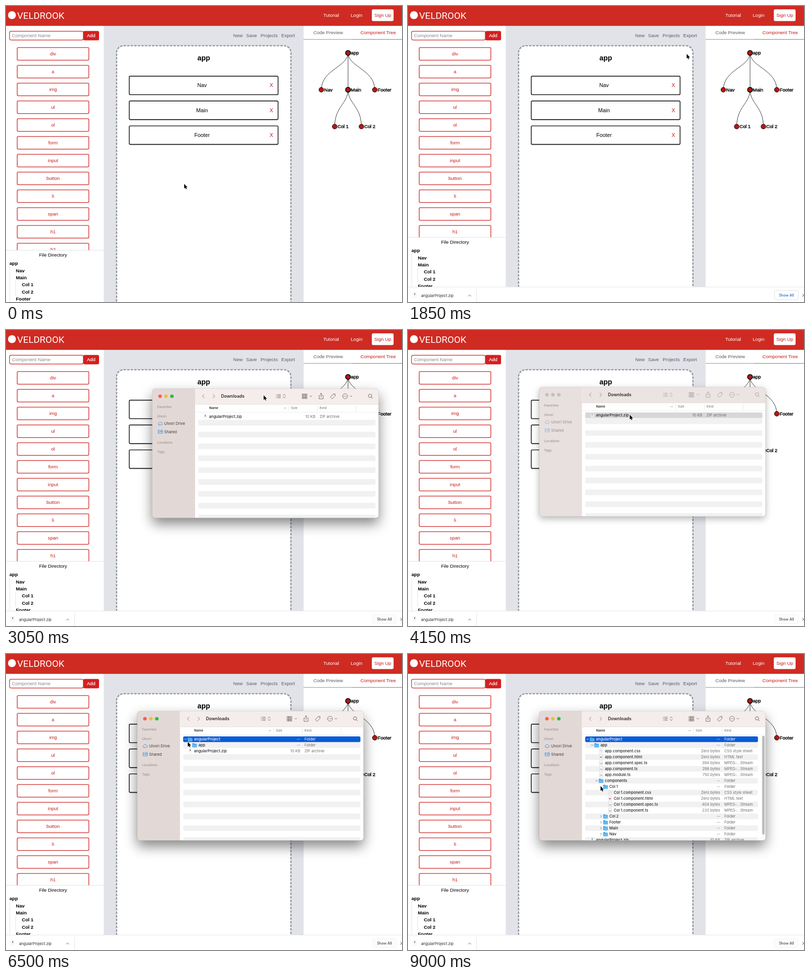
Animation, 800 px wide and 599 px high, one loop 9900 ms. Source, as an HTML page:

```html
<!DOCTYPE html>
<html lang="en">
<head>
<meta charset="utf-8">
<title>Project export</title>
<style>
html, body { margin: 0; width: 100%; height: 100%; overflow: hidden; background: #fff; }
svg { display: block; width: 100vw; height: 100vh; }
text { font: 9.6px "Liberation Sans", Arial, sans-serif; white-space: pre; }
.b { font-weight: 700; }
.big { font-size: 10.8px; }
.red { fill: #c41a1a; }
.dim { fill: #575c66; }
.ui { font: 7.65px Inter, sans-serif; fill: #2b2b2b; }
.ui.name { font-size: 7.58px; font-weight: 500; fill: #222; }
.ui.head { font-size: 6.55px; font-weight: 600; }
.ui.col { font-size: 6.55px; fill: #6a6a6a; }
.ui.side { fill: #403c3c; }
.ui.group { font-size: 6.55px; font-weight: 600; fill: #a39a99; }
.ui.meta { fill: #6e6e6e; }
.ui.r { text-anchor: end; }
.ui.m { text-anchor: middle; }
.m { text-anchor: middle; }
.line { fill: none; stroke-linecap: round; stroke-linejoin: round; }
.base { fill: #fff; filter: drop-shadow(0 12px 13px rgba(0,0,0,.48)); }
.off .base { filter: drop-shadow(0 5px 7px rgba(0,0,0,.28)); }
.bar { fill: #f5edeb; }
.off .bar { fill: #ece4e2; }
.panel { fill: #e2d9d7; }
.off .panel { fill: #e8e0de; }
.off .light { fill: #c6bebd; }
.off .fade { opacity: .5; }
.sel .ui { fill: #fff; }
.sel .chev { stroke: #fff; }
</style>
</head>
<body>
<script>
const LOOP = 9900, STEP = 50, SLIDE = 250, PITCH = 12, TOP = 172.5;

// Markup helpers
const rect = (x, y, w, h, fill, more = '') =>
  `<rect x="${x}" y="${y}" width="${w}" height="${h}" fill="${fill}" ${more}/>`;
const text = (x, y, s, cls = '', more = '') =>
  `<text x="${x}" y="${y}" class="${cls}" ${more}>${s}</text>`;
const line = (d, color, w = 1, more = '') =>
  `<path class="line" d="${d}" stroke="${color}" stroke-width="${w}" ${more}/>`;
const dot = (x, y, r, fill, more = '') =>
  `<circle cx="${x}" cy="${y}" r="${r}" fill="${fill}" ${more}/>`;
const chevDown = (x, y, color, s = 2) => line(`M${x - s} ${y - s / 2}l${s} ${s}l${s} ${-s}`, color, .9);

function header() {
  return rect(0, 0, 800, 40.2, '#cf2b22') +
    dot(12, 18.5, 8, '#fff') +
    text(22.5, 25.5, 'VELDROOK', '', 'fill="#fff" style="font:400 19px Roboto,sans-serif"') +
    text(641, 21.7, 'Tutorial', '', 'fill="#fff"') +
    text(696.5, 21.7, 'Login', '', 'fill="#fff"') +
    rect(739, 6.7, 44, 23.8, '#fff', 'rx="3"') +
    text(761, 21.7, 'Sign Up', 'm red');
}

function palette() {
  const tags = ['div', 'a', 'img', 'ul', 'ol', 'form', 'input', 'button', 'li', 'span', 'h1', 'h2'];
  return rect(0, 40, 197.5, 559, '#fff') +
    rect(7.2, 51.2, 149, 17.6, '#fff', 'rx="3" stroke="#d3201f" stroke-width="1.2"') +
    text(12, 63, 'Component Name', '', 'fill="#85888f"') +
    rect(156, 50.6, 32, 18.8, '#d3201f', 'rx="3"') +
    text(172, 63.2, 'Add', 'm', 'fill="#fff" stroke="#fff" stroke-width=".2"') +
    tags.map((tag, i) =>
      rect(22.6, 84.2 + i * 36, 144.8, 25.4, '#fff', 'rx="2" stroke="#cf2222" stroke-width="1.3"') +
      text(95, 100.2 + i * 36, tag, 'm red')).join('');
}

function directory() {
  const items = [[7, 'app'], [20, 'Nav'], [20, 'Main'], [32, 'Col 1'], [32, 'Col 2'], [20, 'Footer']];
  return rect(0, 494, 197.5, 160, '#fff') +
    line('M0 494.3H197', '#d9dbe0', .8) +
    text(95, 507.4, 'File Directory', 'm') +
    line('M7.5 528V599M19.5 556V585', '#dcdde0', .8) +
    items.map(([x, s], i) => text(x, 524.2 + i * 14.35, s, 'b')).join('');
}

function stage() {
  const tools = [[459, 'New'], [485, 'Save'], [514.3, 'Projects'], [556, 'Export']];
  return rect(197.5, 40, 404, 559, '#e1e3e8') +
    tools.map(([x, s]) => text(x, 63, s, 'dim')).join('') +
    rect(223.4, 80.4, 352.2, 560, '#fff', 'rx="14" stroke="#8f9299" stroke-width="2.4" stroke-dasharray="4.8 2.4"') +
    text(399.5, 110.4, 'app', 'm b', 'style="font-size:14.4px"') +
    ['Nav', 'Main', 'Footer'].map((s, i) => {
      const y = 142 + i * 50.3;
      return rect(249, y + 2.5, 301, 38, '#000', 'rx="3" opacity=".07"') +
        rect(249, y, 300.6, 37.4, '#fff', 'rx="2" stroke="#000" stroke-width="1.4"') +
        text(396, y + 22.3, s, 'm big') +
        text(536, y + 22.3, 'X', 'm big red');
    }).join('');
}

function tree() {
  const nodes = { app: [691, 95], Nav: [637, 169.5], Main: [691, 169.5], Footer: [745, 169.5],
    'Col 1': [664, 244], 'Col 2': [718, 244] };
  const links = [['app', 'Nav'], ['app', 'Main'], ['app', 'Footer'], ['Main', 'Col 1'], ['Main', 'Col 2']];
  const curve = ([x, y], [u, v]) => `M${x} ${y}C${x} ${y + (v - y) * .38} ${u} ${y + (v - y) * .45} ${u} ${v}`;
  return rect(601.5, 40, 199, 559, '#fff') +
    line('M601.5 67.5H701', '#85888e', .9) + line('M701 67.5H800', '#55585e', .8) +
    text(621, 57, 'Code Preview', 'dim') + text(716, 57, 'Component Tree', 'red') +
    links.map(([a, b]) => line(curve(nodes[a], nodes[b]), '#222', .9)).join('') +
    Object.entries(nodes).map(([s, [x, y]]) => {
      const parent = links.some(l => l[0] === s);
      return dot(x, y, 4.9, '#b01818', `stroke="#000" stroke-width="${parent ? 1.7 : .8}"`) +
        text(x + 5.8, y + 3.2, s, '', 'stroke="#000" stroke-width=".4"');
    }).join('');
}

const zipIcon = (x, y) =>
  rect(x - 3, y - 4.5, 6, 9, '#fff', 'stroke="#ddd" stroke-width=".5"') + rect(x - .6, y - 4, 1.3, 4.2, '#555');

function shelf() {
  return rect(0, 568.5, 800, 40, '#fff') + line('M0 568.7H800', '#dcdde0', .8) +
    zipIcon(13.5, 585) + text(26.5, 588.6, 'angularProject.zip', 'ui') +
    line('M122 587.2l2.5 -2.5l2.5 2.5', '#555', .9) +
    line('M138.5 573V599', '#dcdde0', .8) +
    rect(740.5, 575.8, 48, 18.6, '#fff', 'id="showBox" rx="2.2" stroke-width=".8"') +
    text(764.5, 587.7, 'Show All', 'ui m', 'id="showText" style="font-size:7.3px;font-weight:500"') +
    line('M797 583.2l5 5m0 -5l-5 5', '#444', 1);
}

// Moments at which each branch of the file list opens
const AT = { start: -9999, unzip: 5375, project: 6225, app: 6725, parts: 7675, column: 8425 };
const STREAM = 'MPEG-...Stream';
const folder = (level, name, at, open) => ({ level, name, size: '--', kind: 'Folder', at, open, folder: true });
const file = (level, name, size, kind, at) => ({ level, name, size, kind, at });
const code = (level, stem, at, spec, main) => [
  file(level, stem + '.css', 'Zero bytes', 'CSS style sheet', at),
  file(level, stem + '.html', 'Zero bytes', 'HTML text', at),
  file(level, stem + '.spec.ts', spec, STREAM, at),
  file(level, stem + '.ts', main, STREAM, at)];
const rows = [
  folder(0, 'angularProject', AT.unzip, AT.project),
  folder(1, 'app', AT.project, AT.app),
  ...code(2, 'app.component', AT.app, '394 bytes', '298 bytes'),
  file(2, 'app.module.ts', '750 bytes', STREAM, AT.app),
  folder(2, 'components', AT.app, AT.parts),
  folder(3, 'Col 1', AT.parts, AT.column),
  ...code(4, 'Col 1.component', AT.column, '404 bytes', '220 bytes'),
  ...['Col 2', 'Footer', 'Main', 'Nav'].map(s => folder(3, s, AT.parts, Infinity)),
  file(0, 'angularProject.zip', '10 KB', 'ZIP archive', AT.start)];

function icon(row, x) {
  if (row.folder) {
    return `<path d="M${x - 4.5} -4h3.5l1 1.2h4.5v7h-9z" fill="#3f9fe4"/>` +
      rect(x - 4.5, -1.6, 9, 5.8, '#62bbf3', 'rx=".7"') +
      (row.level ? '' : line(`M${x - 1.5} -1.4v5.4M${x + 1.5} -1.4v5.4M${x - 4} 1.2h8`, '#2f86cc', .6));
  }
  if (row.kind === 'ZIP archive') return zipIcon(x, 0);
  const page = rect(x - 3, -4.4, 6, 8.8, '#fff', 'stroke="#c2c2c2" stroke-width=".6"');
  if (row.kind === 'HTML text') return page + dot(x, .3, 1.8, '#d4705f');
  if (row.kind === STREAM) return page + text(x, 2.6, 'TS', 'm', 'fill="#5b7f91" style="font-size:3.6px;font-weight:700"');
  return page + line(`M${x - 1.6} -2h3.2m-3.2 1.7h3.2m-3.2 1.7h3.2`, '#aaa', .5);
}

const rowMarkup = row => {
  const x = 372 + row.level * 9;
  return '<g class="row"><rect class="pill" x="358" y="-5.8" height="11.6" rx="2.5"/>' +
    (row.folder ? `<path class="line chev" d="M-1 -2l2 2l-2 2" stroke="#666" stroke-width=".9" data-x="${x - 9}"/>` : '') +
    `<g class="fade">${icon(row, x)}</g>` + text(x + 7.8, 2.8, row.name, 'ui name') +
    '<g class="shift">' + text(594.5, 2.8, row.size, 'ui meta r') + text(603, 2.8, row.kind, 'ui meta') + '</g></g>';
};

function toolbar() {
  const c = '#6b6462';
  const grid = [0, 1, 2].flatMap(i => [0, 1, 2].map(j =>
    rect(567.8 + i * 3.6, 126.3 + j * 3.6, 2.6, 2.4, 'none', `stroke="${c}" stroke-width=".7"`))).join('');
  return line('M370 127.3l-3.6 3.7l3.6 3.7', '#8d8583', 1) + line('M387.6 127.3l3.6 3.7l-3.6 3.7', '#8d8583', 1) +
    text(404, 134.2, 'Downloads', 'ui', 'style="font-size:8.75px;font-weight:600"') +
    '<g class="fade">' +
    line('M515.5 128h.6m2 0h6M515.5 131h.6m2 0h6M515.5 134h.6m2 0h6', c, 1) +
    line('M529.5 129.5l2.2 -2.2l2.2 2.2M529.5 132.5l2.2 2.2l2.2 -2.2', c, 1) +
    grid + chevDown(585.5, 131, c) +
    line('M603.8 129.5h-1.8v6.8h8.2v-6.8h-1.8M606.1 133v-8m-2 2l2 -2l2 2', c, .9) +
    line('M625.2 132.4l5.2 -6h4v4l-5.6 5.6z', c, .9) + dot(632.4, 128.3, .6, c) +
    dot(654.5, 131, 5, 'none', `stroke="${c}" stroke-width=".9"`) +
    [652.2, 654.5, 656.8].map(x => dot(x, 131, .7, c)).join('') + chevDown(666.5, 131, c) +
    dot(705, 130.2, 3.4, 'none', `stroke="${c}" stroke-width="1"`) + line('M707.5 132.8l2.7 2.7', c, 1) + '</g>';
}

function sidebar() {
  const lights = ['#fb5c54', '#f9bb2e', '#2dbb43'];
  const groups = [[153, 'Favorites'], [172, 'Ulvori'], [225, 'Locations'], [244, 'Tags']];
  return '<rect class="panel" x="265" y="115.5" width="86.5" height="262"/>' +
    lights.map((color, i) => dot(280.7 + i * 12, 131, 3.6, color, 'class="light"')).join('') +
    groups.map(([y, s]) => text(275, y + 2.3, s, 'ui group')).join('') +
    '<g class="fade">' +
    line('M278.6 189h5.2a2 2 0 0 0 .2 -3.9a3 3 0 0 0 -5.4 -.5a2.3 2.3 0 0 0 0 4.4z', '#3c8fd6', .9) +
    line('M277 200v6.2h8.6v-5h-4.6l-1 -1.2zM277 203h8.6M283 199.3h2.6', '#3c8fd6', .9) +
    text(289, 188.8, 'Ulvori Drive', 'ui side') + text(289, 205.8, 'Shared', 'ui side') + '</g>';
}

const frame = 'x="265" y="115.5" width="457.3" height="261.8" rx="6"';

function finder() {
  const stripes = Array.from({ length: 9 }, (_, i) =>
    `<rect class="stripe" x="358" y="${TOP + (2 * i + 1) * PITCH - 5.8}" height="11.6" rx="2.5" fill="#f2f1f2"/>`).join('');
  return `<g id="win"><rect class="base" ${frame}/><g clip-path="url(#frame)">` + sidebar() +
    '<rect class="bar" x="351.5" y="115.5" width="371" height="32"/>' + toolbar() +
    line('M351.5 147.4H722', '#e0d8d6', .7) + line('M351.5 163.3H722', '#e4e4e4', .7) +
    text(380, 157.2, 'Name', 'ui head') +
    '<g class="shift">' + line('M531 156l2 -2l2 2', '#888', .8) +
    line('M540.5 150V161M598.5 150V161', '#dedede', .7) +
    text(545, 157.2, 'Size', 'ui col') + text(603, 157.2, 'Kind', 'ui col') + '</g>' +
    line('M677 150V161', '#dedede', .7, 'id="lastSep"') +
    '<g clip-path="url(#list)">' + stripes + rows.map(rowMarkup).join('') + '</g>' +
    '<g id="scroll">' + rect(713.6, 163.7, 9, 214, '#fafafa') +
    rect(715.6, 165.5, 4.8, 200, '#b9b9b9', 'rx="2.4"') + '</g></g>' +
    `<rect ${frame} fill="none" stroke="#000" stroke-opacity=".18" stroke-width=".6"/></g>`;
}

document.body.innerHTML = `<svg viewBox="0 0 800 599" xmlns="http://www.w3.org/2000/svg">
<defs><clipPath id="frame"><rect ${frame}/></clipPath>
<clipPath id="list"><rect x="352" y="164" width="371" height="214"/></clipPath></defs>
${palette()}<g id="dir">${directory()}</g>${stage()}${tree()}${header()}
<g id="shelf">${shelf()}</g>${finder()}
<path id="cursor" d="M0 0V9.4L2.1 7.5L3.6 10.8L5.2 10.1L3.8 6.9H6.6Z" fill="#000" stroke="#fff" stroke-width="1.2" paint-order="stroke" stroke-linejoin="round"/>
</svg>`;

const el = id => document.getElementById(id);
const all = sel => [...document.querySelectorAll(sel)];
const move = (node, x, y) => node.setAttribute('transform', `translate(${x} ${y})`);
const show = (node, amount) => node.setAttribute('opacity', +amount);
const rowEls = all('.row').map(g => ({ g, pill: g.querySelector('.pill'), chev: g.querySelector('.chev') }));
const stripeEls = all('.stripe'), shiftEls = all('.shift');

const clamp = p => Math.max(0, Math.min(1, p));
const ease = p => (p = clamp(p), p < .5 ? 2 * p * p : 1 - 2 * (1 - p) ** 2);
const span = (t, a, b) => ease((t - a) / (b - a));

// Pointer keys: time, x, y
const pointer = [
  [200, 360, 360], [750, 571, 62], [1200, 571, 63], [1850, 563, 97], [1900, 563, 97],
  [2450, 470, 606], [2750, 470, 606], [3040, 520.5, 132], [3150, 520.5, 132], [3700, 490, 129],
  [3780, 490, 129], [4050, 448, 171.5], [5600, 448, 171.5], [6100, 363, 173], [6350, 363, 173],
  [6650, 371.5, 183], [7200, 371.5, 183], [7550, 380.5, 256], [7950, 380.5, 256], [8300, 389, 267.5]];

function pointerAt(t) {
  const i = pointer.findIndex(k => k[0] > t);
  if (i === 0) return pointer[0].slice(1);
  if (i < 0) return pointer.at(-1).slice(1);
  const [a, x, y] = pointer[i - 1], [b, u, v] = pointer[i];
  const p = span(t, a, b);
  return [x + (u - x) * p, y + (v - y) * p];
}

function drawList(t, active) {
  const narrow = t >= AT.column;
  const width = narrow ? 349 : 358;
  const shown = rows.filter(r => r.at <= t);
  const fresh = shown.findIndex(r => t - r.at < SLIDE);
  let y = 0;
  rows.forEach((row, i) => {
    const { g, pill, chev } = rowEls[i];
    const p = ease((t - row.at) / SLIDE);
    const picked = i === 0 || (row.at === AT.start && t >= 3950 && t < 5400);
    move(g, 0, TOP + y * PITCH);
    show(g, p);
    g.classList.toggle('sel', picked && active);
    pill.setAttribute('width', width);
    pill.setAttribute('fill', !picked ? 'none' : active ? '#0a5ad8' : '#d8d7d8');
    if (chev) chev.setAttribute('transform', `translate(${chev.dataset.x} 0) rotate(${90 * ease((t - row.open) / 150)})`);
    y += p;
  });
  // Stripes stay blank behind sliding rows
  stripeEls.forEach((s, i) => {
    const n = 2 * i + 1;
    s.setAttribute('width', width);
    show(s, fresh < 0 || n < fresh || n >= shown.length);
  });
  shiftEls.forEach(g => move(g, narrow ? 36 : 0, 0));
  show(el('lastSep'), !narrow);
  show(el('scroll'), narrow);
}

function draw(t) {
  const rise = span(t, 1000, 1250);
  move(el('dir'), 0, -26 * rise);
  move(el('shelf'), 0, 31 * (1 - rise));
  const front = t < 2650;
  el('showBox').setAttribute('stroke', front ? '#d5d8dd' : '#f1f1f2');
  el('showBox').setAttribute('fill', front ? '#fff' : '#fcfcfc');
  el('showText').style.fill = front ? '#1a67d2' : '#4a4a4a';

  const active = t < 4100 || t >= 4400;
  const drag = 1 - span(t, 3150, 3700);
  show(el('win'), t >= 2800);
  move(el('win'), 30.5 * drag, 3 * drag);
  el('win').classList.toggle('off', !active);
  drawList(t, active);
  move(el('cursor'), ...pointerAt(t));
}

const begin = performance.now();
function tick() {
  const t = (performance.now() - begin) % LOOP;
  draw(Math.floor(t / STEP) * STEP);
  requestAnimationFrame(tick);
}
tick();
</script>
</body>
</html>
```
